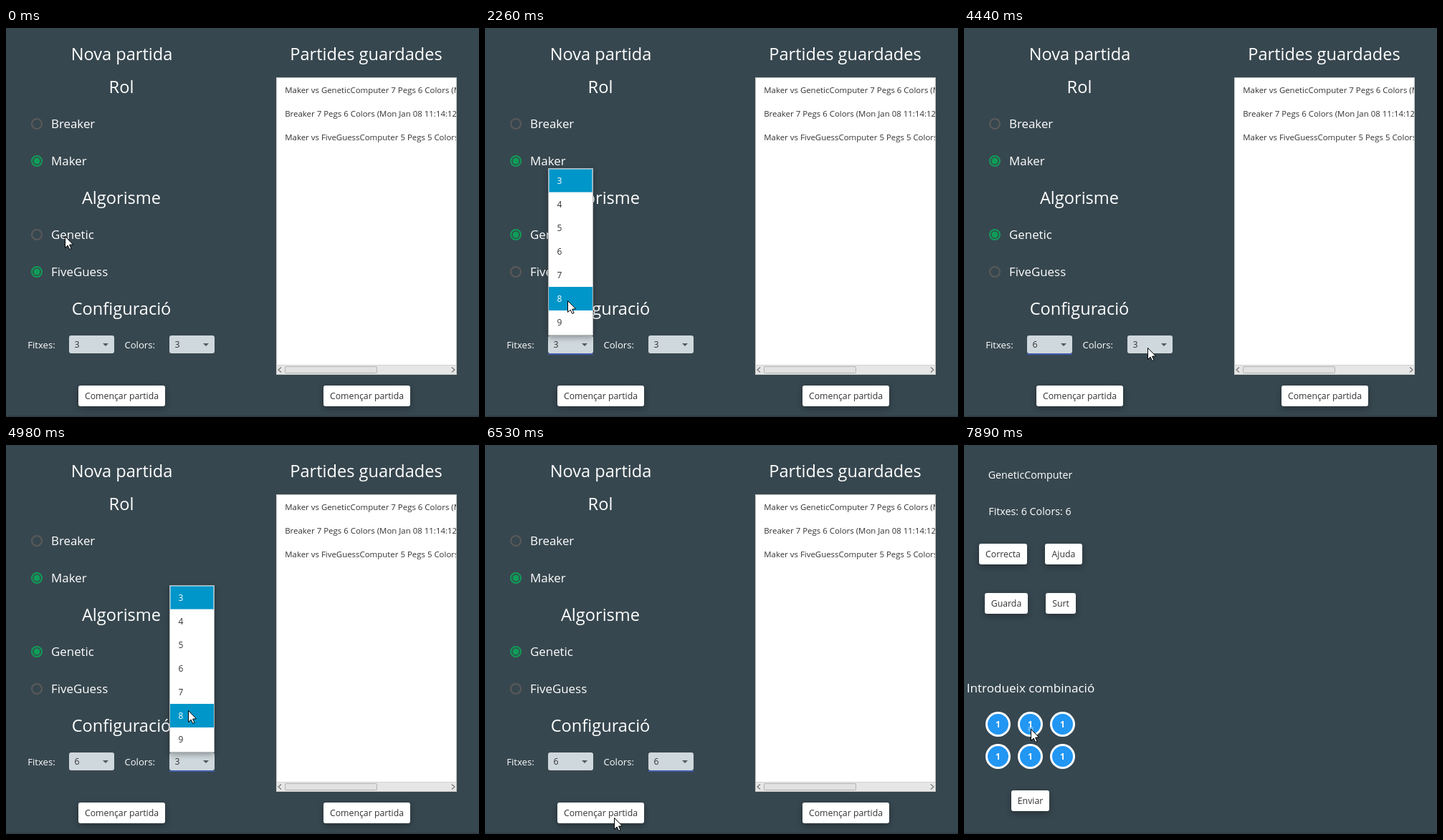
An HTML page with a canvas that plays this animation: 660 by 544 pixels, repeating every 8 s.

```html
<!DOCTYPE html>
<html lang="ca">
<head>
<meta charset="utf-8">
<title>Nova partida</title>
<style>
html, body { margin: 0; overflow: hidden; background: #37474f; }
canvas { display: block; }
</style>
</head>
<body>
<canvas id="stage" width="660" height="544"></canvas>
<script>
const ctx = document.getElementById('stage').getContext('2d');
const LOOP = 8000, SAMPLE = 133;
const INK = '#333', BLUE = '#0096c9';

// Moments of the clicks that change the interface.
const CLICK = {
  genetic: 420, openPegs: 1480, pickPegs: 3510, focusColors: 4590,
  openColors: 4710, pickColors: 5630, start: 6650, askCode: 6800, press: 7890
};

// Pointer strokes: start time, end time, destination.
const strokes = [
  [160, 160, 38, 327],
  [300, 300, 41, 291],
  [540, 780, 125, 411],
  [1060, 1060, 129, 430],
  [1210, 1360, 138, 446],
  [1870, 1990, 115, 405],
  [2140, 2260, 115, 381],
  [2820, 3120, 111, 317],
  [3630, 4050, 274, 470],
  [4170, 4290, 261, 451],
  [4440, 4440, 256, 447],
  [4830, 5100, 254, 362],
  [5240, 5360, 253, 325],
  [5900, 6260, 183, 522],
  [6410, 6410, 180, 521],
  [7230, 7470, 124, 451],
  [7630, 7890, 93, 397]
];

// Each stroke slows towards its end; the pointer is sampled at a fixed rate.
function pointerAt(t) {
  let x = 82, y = 291;
  for (const [start, end, toX, toY] of strokes) {
    if (t < start) break;
    const steps = Math.round((end - start) / SAMPLE);
    const done = Math.min(steps, Math.floor((t - start) / SAMPLE + .1));
    const ease = 1 - (1 - (done + 1) / (steps + 1)) ** 2;
    x += (toX - x) * ease;
    y += (toY - y) * ease;
  }
  return [Math.round(x), Math.round(y)];
}

function text(str, x, y, size, color = '#fff', align = 'left', weight = 400) {
  ctx.font = `${weight} ${size}px "Open Sans", "Noto Sans", sans-serif`;
  ctx.fillStyle = color;
  ctx.textAlign = align;
  ctx.fillText(str, x, y);
}

function rect(x, y, w, h, color) {
  ctx.fillStyle = color;
  ctx.fillRect(x, y, w, h);
}

function roundRect(x, y, w, h, r, color) {
  ctx.fillStyle = color;
  ctx.beginPath();
  ctx.roundRect(x, y, w, h, r);
  ctx.fill();
}

function disc(x, y, r, color) {
  ctx.fillStyle = color;
  ctx.beginPath();
  ctx.arc(x, y, r, 0, 7);
  ctx.fill();
}

function raised(x, y, w, h, r, color) {
  ctx.save();
  ctx.shadowColor = 'rgba(0,0,0,.32)';
  ctx.shadowBlur = 8;
  ctx.shadowOffsetY = 3;
  roundRect(x, y, w, h, r, color);
  ctx.restore();
}

function polygon(points, color) {
  ctx.beginPath();
  points.forEach(([x, y]) => ctx.lineTo(x, y));
  ctx.closePath();
  ctx.fillStyle = color;
  ctx.fill();
}

function button(label, x, y, w) {
  raised(x, y, w, 29, 3, '#fff');
  text(label, x + w / 2, y + 19, 12.3, INK, 'center');
}

function radio(label, y, selected) {
  ctx.strokeStyle = selected ? '#0f9d58' : '#5a5a5a';
  ctx.lineWidth = 2;
  ctx.beginPath();
  ctx.arc(43, y, 7, 0, 7);
  ctx.stroke();
  if (selected) disc(43, y, 4.5, '#0f9d58');
  text(label, 63, y + 6, 16.9);
}

function combo(x, value, focused) {
  roundRect(x, 430, 63, 25, 3, '#cfd8dc');
  text(value, x + 7.5, 447, 12.3, INK);
  polygon([[x + 47, 441], [x + 55, 441], [x + 51, 445]], '#4f5a5f');
  if (focused) rect(x, 455, 63, 2, '#4059a9');
  else rect(x + 1, 455, 61, 1, '#3a4448');
}

function popup(x, px, py) {
  raised(x, 196, 63, 234, 0, '#b4b8ba');
  rect(x + 1, 197, 61, 232, '#fff');
  const hover = px > x && px < x + 63 ? Math.floor((py - 197) / 33) : -1;
  for (let i = 0; i < 7; i++) {
    const y = 197 + i * 33, lit = i === 0 || i === hover;
    if (lit) rect(x + 1, y, 61, 33, BLUE);
    text(i + 3, x + 12.5, y + 21, 12, lit ? '#fff' : INK);
  }
  ctx.strokeStyle = '#6fc0de';
  ctx.lineWidth = 1;
  ctx.strokeRect(x + 1.5, 197.5, 60, 32);
}

function chevron(x, dir) {
  ctx.beginPath();
  ctx.moveTo(x - 2 * dir, 474.5);
  ctx.lineTo(x + 2 * dir, 478);
  ctx.lineTo(x - 2 * dir, 481.5);
  ctx.strokeStyle = '#777';
  ctx.lineWidth = 1.2;
  ctx.stroke();
}

function savedList() {
  rect(377, 69, 252, 416, '#c8c8c8');
  rect(378, 70, 250, 414, '#fff');
  ctx.save();
  ctx.beginPath();
  ctx.rect(378, 70, 250, 400);
  ctx.clip();
  ['Maker vs GeneticComputer 7 Pegs 6 Colors (Mon',
   'Breaker 7 Pegs 6 Colors (Mon Jan 08 11:14:12',
   'Maker vs FiveGuessComputer 5 Pegs 5 Colors (Mon'
  ].forEach((row, i) => text(row, 389.2, 91 + i * 33, 11.45, INK));
  ctx.restore();
  rect(378, 471, 250, 13, '#e6e6e6');
  rect(378, 471, 250, 1, '#d2d2d2');
  roundRect(389, 473, 129, 10, 2, '#b4b4b4');
  roundRect(390, 474, 127, 8, 1, '#e2e2e2');
  chevron(382, -1);
  chevron(624, 1);
}

function setupScreen(t, px, py) {
  const title = (str, x, y) => text(str, x, y, 23.6, '#fff', 'center');
  title('Nova partida', 161.5, 45);
  title('Rol', 161, 91);
  title('Algorisme', 161, 246);
  title('Configuració', 161, 401);
  title('Partides guardades', 502.5, 45);

  const genetic = t >= CLICK.genetic;
  radio('Breaker', 134, false);
  radio('Maker', 186, true);
  radio('Genetic', 289, genetic);
  radio('FiveGuess', 341, !genetic);

  text('Fitxes:', 30.3, 448, 13.1);
  text('Colors:', 165.4, 448, 13.1);
  combo(88, t < CLICK.pickPegs ? 3 : 6, t >= CLICK.openPegs && t < CLICK.focusColors);
  combo(228, t < CLICK.pickColors ? 3 : 6, t >= CLICK.focusColors);

  savedList();
  button('Començar partida', 101, 500, 121);
  button('Començar partida', 443, 500, 121);
  if (t >= CLICK.openPegs && t < CLICK.pickPegs) popup(88, px, py);
  if (t >= CLICK.openColors && t < CLICK.pickColors) popup(228, px, py);
}

function gameScreen(t) {
  text('GeneticComputer', 92.5, 47, 14.25, '#fff', 'center');
  text('Fitxes: 6 Colors: 6', 92, 98, 14.25, '#fff', 'center');
  button('Correcta', 21, 138, 67);
  button('Ajuda', 113, 138, 52);
  button('Guarda', 29, 207, 60);
  button('Surt', 114, 207, 42);
  if (t < CLICK.askCode) return;

  text('Introdueix combinació', 93, 346, 17.1, '#fff', 'center');
  for (let i = 0; i < 6; i++) {
    const x = 47.5 + (i % 3) * 45, y = 390.5 + Math.floor(i / 3) * 45;
    disc(x, y, 17.5, '#fff');
    disc(x, y, 14.5, '#2196f3');
    text(1, x, y + 4.5, 12, '#fff', 'center', 700);
  }
  if (t >= CLICK.press) disc(93, 397, 4, 'rgba(255,255,255,.25)');
  button('Enviar', 66, 483, 53);
}

function drawPointer(x, y) {
  ctx.save();
  ctx.translate(x + .5, y + .5);
  polygon([[0, 0], [0, 16], [3.6, 12.6], [6.2, 18], [8.6, 17], [6.1, 11.7], [11, 11.3]], '#fff');
  ctx.strokeStyle = '#000';
  ctx.lineWidth = 1;
  ctx.stroke();
  ctx.restore();
}

function draw(t) {
  const [px, py] = pointerAt(t);
  rect(0, 0, 660, 544, '#37474f');
  rect(0, 542, 660, 2, 'rgba(0,0,0,.12)');
  if (t < CLICK.start) setupScreen(t, px, py);
  else gameScreen(t);
  drawPointer(px, py);
}

const begin = performance.now();
function tick() {
  draw((performance.now() - begin) % LOOP);
  requestAnimationFrame(tick);
}
tick();
</script>
</body>
</html>
```
